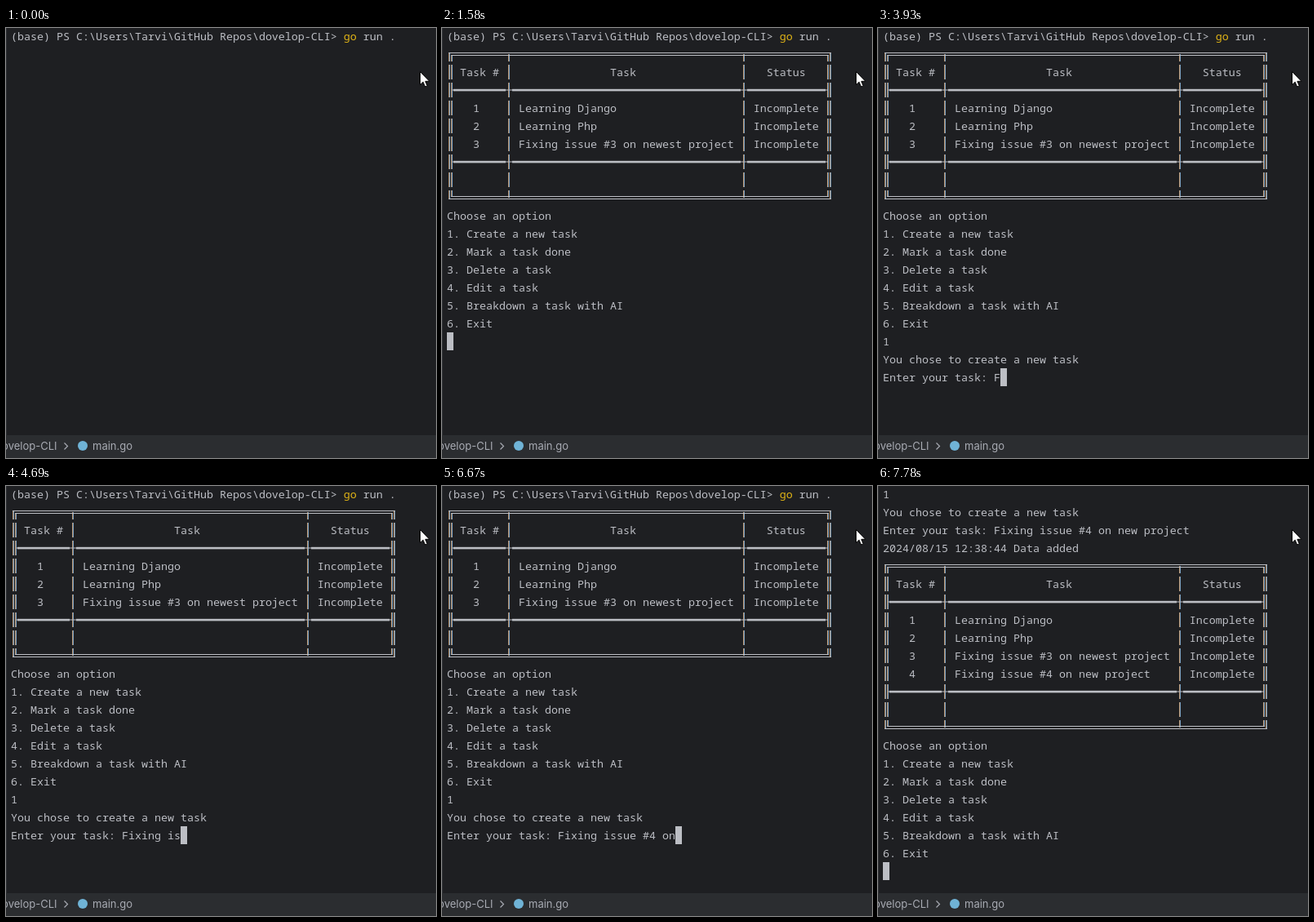
An HTML page for the animation above (8000 ms loop, 527 px wide and 527 px high).

```html
<!DOCTYPE html>
<html lang="en">
<head>
<meta charset="utf-8">
<title>Task list in a terminal</title>
<style>
  html, body { margin: 0; width: 100%; height: 100%; overflow: hidden; background: #1e1f22; }
  svg { display: block; width: 527px; height: 527px; }
  text { white-space: pre; }
  #screen text { font: 13.3333px "Noto Sans Mono", "DejaVu Sans Mono", monospace; fill: #bcbec4; }
  #screen .command { fill: #e0b416; }
  #footer text { font: 13px Inter, Roboto, sans-serif; fill: #a8abb3; }
  .caret, .rule { fill: #bcbec4; }
  .warm { fill: #bb9672; }
  .cool { fill: #7a9fc0; }
</style>
</head>
<body>
<svg viewBox="0 0 527 527">
  <rect width="527" height="527" fill="#1e1f22"/>
  <rect width="1" height="499" fill="#2f3135"/>
  <g id="screen"></g>
  <g id="footer">
    <rect y="499" width="527" height="28" fill="#2b2d30"/>
    <text x="62.5" y="517" text-anchor="end">dovelop-CLI</text>
    <path d="M71.5 508.5l4 4-4 4" fill="none" stroke="#a8abb3" stroke-width="1.2"/>
    <circle cx="94" cy="512" r="6" fill="#6fb3d6"/>
    <text x="106" y="517">main.go</text>
  </g>
  <path d="M507.5 53.5v16.2l3.7-3.5 2.4 5.8 2.7-1.1-2.4-5.6h5z" fill="#fff" stroke="#000"/>
</svg>
<script>
const LOOP = 8000, LEFT = 6, CELL = 8, LINE = 22, ROWS = 22;
const EDGES = [0, 58], DIVIDERS = [9, 45];
const screenEl = document.getElementById("screen");

const PROMPT = "(base) PS C:\\Users\\Tarvi\\GitHub Repos\\dovelop-CLI> ";
const COMMAND = "go";
const ENTRY = "Enter your task: ";
const TASK = "Fixing issue #4 on new project";
const tasks = ["Learning Django", "Learning Php", "Fixing issue #3 on newest project"];
const menu = ["Choose an option", "1. Create a new task", "2. Mark a task done", "3. Delete a task",
  "4. Edit a task", "5. Breakdown a task with AI", "6. Exit"];

const row = (text = "", kind = "plain") => ({ text, kind });
const cells = (parts) => parts.reduce((line, [col, s]) => line.padEnd(col) + s, "");

function table(list) {
  return [
    row("", "top"),
    row(cells([[2, "Task #"], [25, "Task"], [49, "Status"]]), "body"),
    row("", "middle"),
    ...list.map((name, i) => row(cells([[4, i + 1], [11, name], [47, "Incomplete"]]), "body")),
    row("", "middle"),
    row("", "body"),
    row("", "bottom")
  ];
}

const start = [row(PROMPT + COMMAND + " run . ")];
const listing = [...start, ...table(tasks), ...menu.map((s) => row(s))];
const asking = [...listing, row("1"), row("You chose to create a new task")];
const typing = (s) => [...asking, row(ENTRY + s)];
const typed = (n) => typing(TASK.slice(0, n));
const added = [...typed(TASK.length), row("2024/08/15 12:38:44 Data added"),
  ...table([...tasks, TASK]), ...menu.map((s) => row(s)), row()];
const waiting = [...start, row()];
const choosing = [...listing, row()];

// [time in ms, lines, caret hidden]
const steps = [
  [0, start, true], [250, start],
  [530, waiting], [1060, waiting, true], [1460, waiting],
  [1580, choosing], [2110, choosing, true], [2670, choosing], [3070, choosing, true],
  [3220, [...listing, row("1")]],
  [3370, typed(0)], [3930, typed(1)],
  [4080, typed(2)], [4200, typed(4)], [4320, typed(5)], [4440, typed(7)],
  [4690, typed(9)], [4840, typed(10)], [4990, typed(12)], [5140, typed(13)],
  [5450, typing("Fixing issue $")], [5850, typing("Fixing issue $"), true],
  [6000, typed(13)], [6120, typed(14)], [6270, typed(15)], [6390, typed(16)],
  [6670, typed(18)], [6820, typed(19)],
  [6970, typed(21)], [7090, typed(24)], [7210, typed(26)],
  [7360, typed(29)], [7660, typed(30)],
  [7780, added]
];

function add(tag, attrs, parent = screenEl) {
  const el = document.createElementNS("http://www.w3.org/2000/svg", tag);
  for (const key in attrs) el.setAttribute(key, attrs[key]);
  return parent.appendChild(el);
}
const box = (cls, x, y, width, height) => add("rect", { class: cls, x, y, width, height });
const colX = (col) => LEFT + col * CELL;

// upright stroke with the colour fringes of subpixel rendering
function upright(x, top, end) {
  box("warm", x, top, 1, end - top);
  box("cool", x + 1, top, 1, end - top);
}

function drawRules(kind, mid) {
  const isTop = kind === "top", isBottom = kind === "bottom";
  const top = isTop ? mid : mid - 9;
  const end = isBottom ? mid : mid + 9;
  const x0 = colX(EDGES[0]), x1 = colX(EDGES[1]);

  for (const col of DIVIDERS) upright(colX(col) + 3, top, end);
  for (const col of EDGES) {
    // the stroke facing away from the table reaches the far rule
    for (const dx of [2, 5]) {
      const reach = (col === EDGES[0]) === (dx === 2) ? 2 : -1;
      upright(colX(col) + dx, isTop ? mid - reach : top, isBottom ? mid + reach : end);
    }
  }
  if (isTop || isBottom) {
    const far = isTop ? mid - 2 : mid + 1;
    const near = isTop ? mid + 1 : mid - 2;
    box("rule", x0 + 2, far, x1 - x0 + 5, 1);
    box("rule", x0 + 5, near, x1 - x0 - 1, 1);
  }
  if (kind === "middle") {
    box("rule", x0 + 6, mid - 0.5, x1 - x0 - 3, 1);
    const stops = [EDGES[0], ...DIVIDERS, EDGES[1]];
    for (let i = 1; i < stops.length; i++) {
      const x = colX(stops[i - 1] + 1);
      box("rule", x, mid - 1.2, colX(stops[i]) - x, 2.6);
    }
  }
}

function drawText(text, y) {
  const el = add("text", { x: LEFT, y });
  if (!text.startsWith(PROMPT)) { el.textContent = text; return; }
  el.textContent = PROMPT;
  add("tspan", { class: "command" }, el).textContent = COMMAND;
  add("tspan", {}, el).textContent = text.slice(PROMPT.length + COMMAND.length);
}

function draw([, lines, hidden]) {
  screenEl.replaceChildren();
  const view = lines.slice(-ROWS);
  view.forEach(({ text, kind }, i) => {
    if (kind !== "plain") drawRules(kind, i * LINE + 10);
    if (text) drawText(text, i * LINE + 15);
  });
  const last = view.length - 1;
  if (!hidden) box("caret", colX(view[last].text.length), last * LINE - 1, CELL, LINE);
}

let shown = null;
const origin = performance.now();
function tick() {
  const t = (performance.now() - origin) % LOOP;
  const step = steps.findLast(([at]) => at <= t) || steps[0];
  if (step !== shown) draw(shown = step);
  requestAnimationFrame(tick);
}
tick();
</script>
</body>
</html>
```
